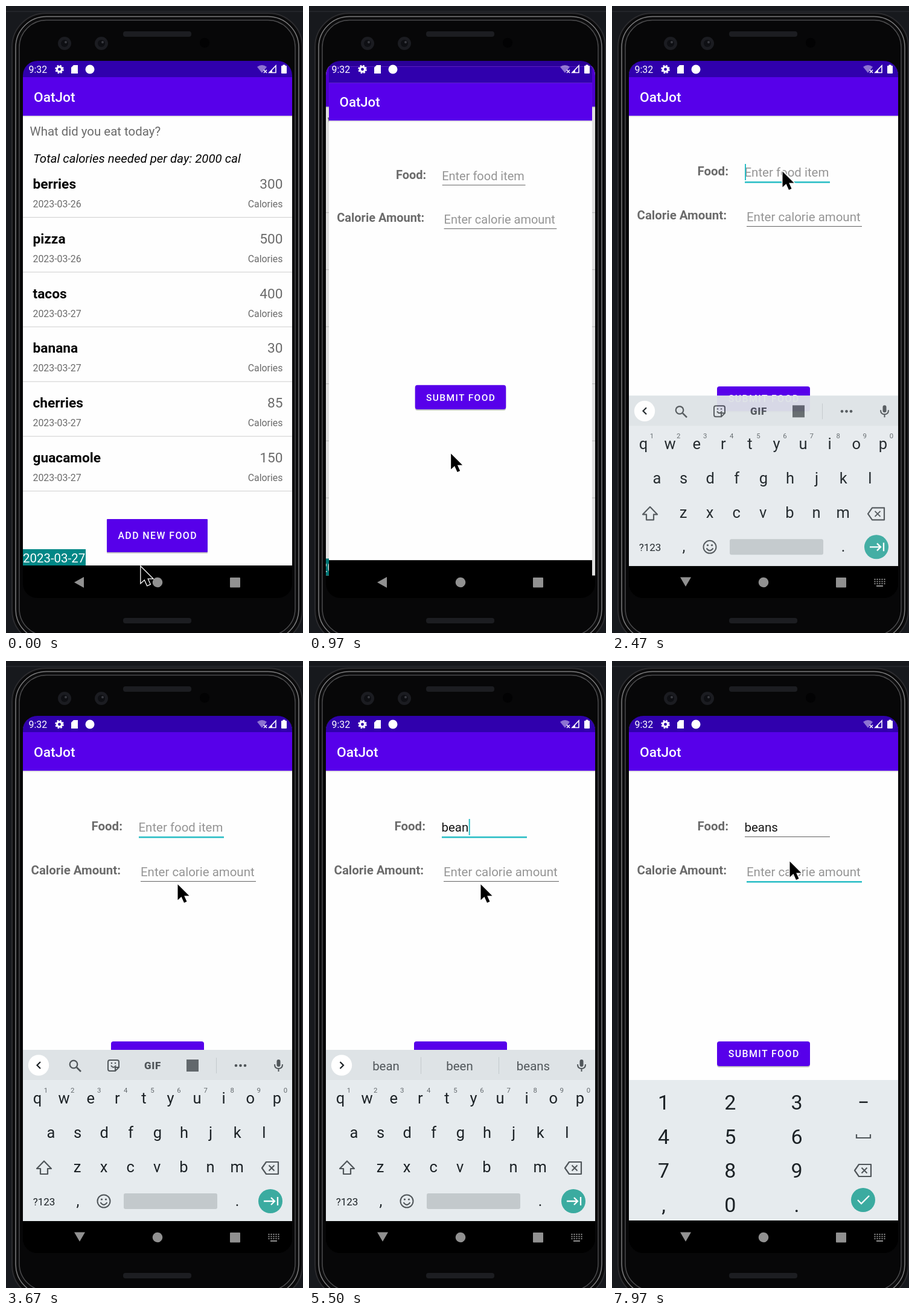
These frames come from a looping animation (492 px wide and 1040 px high, 8 s). An HTML page:

```html
<!DOCTYPE html>
<html lang="en">
<head>
<meta charset="utf-8">
<title>Food log</title>
<style>
  html, body { margin: 0; width: 100%; height: 100%; overflow: hidden; background: #17191d; }
  svg { display: block; width: 492px; height: 1040px; font-family: Roboto, sans-serif; }
</style>
</head>
<body>
<svg id="stage" viewBox="0 0 492 1040"></svg>
<script>
const LOOP = 8000;
const PURPLE = '#5700ea', PAPER = '#fefefe', MUTED = '#6b6b6b', HINT = '#959595', KEY = '#1c2226', ICON = '#50565a';
const KEYBOARD = '#e6ebee', TOOLBAR = '#dee3e6', RULE = '#c3c9cc';
const TEAL = '#2cbec6', GREEN = '#3baba0', NAV = '#919191';
const BODY = 20.44, SMALL = 15.9, LARGE = 22.7;

const rect = (x, y, w, h, fill, extra = '') =>
  `<rect x="${x}" y="${y}" width="${w}" height="${h}" fill="${fill}" ${extra}/>`;
const circle = (x, y, r, fill, extra = '') =>
  `<circle cx="${x}" cy="${y}" r="${r}" fill="${fill}" ${extra}/>`;
const line = (d, color, width = 2, extra = '') =>
  `<path d="${d}" fill="none" stroke="${color}" stroke-width="${width}" ${extra}/>`;
const shape = (d, fill) => `<path d="${d}" fill="${fill}"/>`;
const text = (s, x, y, size, fill, extra = '') =>
  `<text x="${x}" y="${y}" font-size="${size}" fill="${fill}" ${extra}>${s}</text>`;
const MID = 'text-anchor="middle"', END = 'text-anchor="end"', BOLD = 'font-weight="700"', MEDIUM = 'font-weight="500"';

function phoneBody() {
  const speaker = y => rect(194, y, 113, 9, '#1c1d21', 'rx="4"');
  const lens = x => circle(x, 62, 11, '#1b1c21') + circle(x, 62, 6, '#0e0f13') + circle(x + 2, 60, 2, '#3a3b42');
  return rect(0, 0, 492, 1040, '#17191d') + rect(0, 8, 492, 2, '#23252a') +
    rect(10, 12, 481, 1046, '#0a0a0b', 'rx="56" stroke="#2c2c2f" stroke-width="2"') +
    rect(16, 17.5, 469, 1034, '#0c0c0d', 'rx="51" stroke="#7c7c7d" stroke-width="1.5"') +
    rect(22, 23.5, 457, 1021, '#070708', 'rx="45" stroke="#4a4a4c" stroke-width="1.5"') +
    speaker(42) + speaker(1015) + lens(97) + lens(158) + circle(329, 61, 8, '#020203');
}

const appWindow = content =>
  rect(28, 91, 446, 891, '#000') + rect(28, 118, 446, 810, PAPER) + content +
  rect(28, 182, 446, 2, '#d4d4d8', 'opacity=".7"') +
  rect(28, 91, 446, 27, '#3000ad') + rect(28, 118, 446, 64, PURPLE) +
  text('OatJot', 46, 159, LARGE, '#fff', MEDIUM);

function button(label, x, y, w, h, r) {
  return rect(x, y + 2, w, h, '#b0b0b0', `rx="${r}" opacity=".75"`) + rect(x, y, w, h, PURPLE, `rx="${r}"`) +
    text(label, x + w / 2 + .7, y + h / 2 + 5.8, SMALL, '#fff', `${MID} ${MEDIUM} letter-spacing="1.42"`);
}

function foodList() {
  const foods = [['berries', 300, 26], ['pizza', 500, 26], ['tacos', 400, 27],
    ['banana', 30, 27], ['cherries', 85, 27], ['guacamole', 150, 27]];
  const rows = foods.map(([name, calories, day], i) => {
    const y = i * 90.8;
    return text(name, 44.5, 303 + y, LARGE, '#050505', BOLD) +
      text(`2023-03-${day}`, 44.5, 334 + y, SMALL, MUTED) +
      text(calories, 458.5, 303 + y, LARGE, MUTED, END) +
      text('Calories', 458.5, 334 + y, SMALL, MUTED, END) +
      rect(28, 350 + y, 446, 1.1, '#d2d2d2');
  }).join('');
  return appWindow(text('What did you eat today?', 39.5, 215, BODY, MUTED) +
    text('Total calories needed per day: 2000 cal', 45, 260, BODY, '#050505', 'font-style="italic"') + rows +
    button('ADD NEW FOOD', 167, 851, 167, 55, 1) +
    rect(28, 901, 104, 27, '#018786') + text('2023-03-27', 28, 923, BODY, '#fff'));
}

function foodForm() {
  return appWindow(text('Food:', 141.5, 281, BODY, MUTED, BOLD) +
    text('Calorie Amount:', 41.5, 354, BODY, MUTED, BOLD) +
    text('', 219.5, 283, BODY, HINT, 'id="food"') + text('Enter calorie amount', 223, 357, BODY, HINT) +
    rect(220, 291, 141, 1, MUTED, 'id="foodLine"') + rect(223, 365, 191, 1, MUTED, 'id="calLine"') +
    rect(220, 262, 2, 27, TEAL, 'id="foodCaret"') + rect(223, 336, 2, 27, TEAL, 'id="calCaret"') +
    button('SUBMIT FOOD', 174, 631, 154, 41, 4));
}

function statusIcons() {
  return text('9:32', 37.5, 110.5, SMALL, '#fff') +
    circle(88.5, 105, 4, 'none', 'stroke="#fff" stroke-width="3.2"') +
    circle(88.5, 105, 6.2, 'none', 'stroke="#fff" stroke-width="2.2" stroke-dasharray="2.8 2.07"') +
    shape('M112 98h7v14h-11v-10z', '#fff') + circle(139, 105, 7.5, '#fff') +
    `<g opacity=".45">${shape('M416 101Q424 95 432 101L424 111z', '#fff')}</g>` +
    line('M427 106l5 5m0-5l-5 5', '#fff', 1.5) +
    line('M436 110.5H447V99z', '#fff', 1.6) + shape('M441 105v6h-6z', '#fff') +
    rect(456, 99, 9, 13, '#fff', 'rx="1"') + rect(458.5, 97.5, 4, 2, '#fff');
}

function navIcons() {
  let keys = '';
  for (let i = 0; i < 15; i++) keys += rect(434.5 + i % 5 * 4, 950 + Math.floor(i / 5) * 3.6, 2, 2, NAV);
  return `<g id="navBack">${shape('M113 956L129 947V965z', NAV)}</g>` +
    `<g id="navHide">${shape('M113 947.5H131L122 963z', NAV)}${keys}${rect(438, 961, 11, 2, NAV)}</g>` +
    circle(251, 956, 8.3, NAV) + rect(371, 948, 17, 16.5, NAV, 'rx="1"');
}

const backspace = (x, y) => line(`M${x - 14} ${y}l7-10h20v20h-20z`, ICON, 2.2, 'stroke-linejoin="round"') +
  line(`M${x - 2.5} ${y - 4.5}l9 9m0-9l-9 9`, ICON, 2);
const chevron = d => circle(54, 670.5, 17.2, '#fff') + line(d, KEY, 2.2);

function letterKeys() {
  const row = (letters, x, y) => [...letters].map((c, i) => text(c, x + i * 44.1, y, 25.5, KEY, MID)).join('');
  const digits = [...'1234567890'].map((c, i) => text(c, 66 + i * 44.1, 715.5, 11.4, '#62686c', MID)).join('');
  const tools = chevron('M57 665l-5.5 5.5 5.5 5.5') +
    circle(112, 669, 6.3, 'none', `stroke="${ICON}" stroke-width="2.2"`) + line('M117 674l7 7', ICON, 2.6) +
    line('M172 662h12q3 0 3 3v9l-6 6h-9q-3 0-3-3v-12q0-3 3-3zM187 674h-6v6', ICON, 2) +
    line('M174 671q4 6 8 0', ICON, 2) + circle(175, 667, 1.2, ICON) + circle(181, 667, 1.2, ICON) +
    text('GIF', 243, 676.5, 17, ICON, `${MID} font-weight="900" letter-spacing=".6"`) +
    rect(299, 661, 20, 20, '#62686c') + rect(348, 658, 1, 26, RULE) +
    [381, 388.5, 396].map(x => circle(x, 671, 2.3, ICON)).join('');
  const suggestions = chevron('M51.5 665l5.5 5.5-5.5 5.5') +
    [127.5, 249.5, 371.5].map((x, i) => text('', x, 678.5, BODY, ICON, `${MID} id="word${i}"`)).join('') +
    rect(185, 657, 1, 28, RULE) + rect(314, 657, 1, 28, RULE);
  return rect(28, 645, 446, 284, KEYBOARD) + rect(28, 645, 446, 50, TOOLBAR) +
    `<g id="tools">${tools}</g><g id="suggestions">${suggestions}</g>` +
    rect(448.5, 661, 6, 12, ICON, 'rx="3"') + line('M445 669q0 7 6.5 7t6.5-7M451.5 676v5', ICON, 2) +
    digits + row('qwertyuiop', 52, 734) + row('asdfghjkl', 74.5, 791) + row('zxcvbnm', 118, 848) +
    line('M63 829.5L75 842H69V851H57V842H51z', ICON, 2.2, 'stroke-linejoin="round"') + backspace(438, 841) +
    text('?123', 63, 902.5, 17, KEY, MID) + text(',', 119, 904, 25, KEY, MID) + text('.', 383, 904, 25, KEY, MID) +
    circle(162, 896, 10.5, 'none', `stroke="${ICON}" stroke-width="2"`) + line('M156.5 898q5.5 8 11 0', ICON, 2) +
    circle(158.5, 893, 1.6, ICON) + circle(165.5, 893, 1.6, ICON) +
    rect(195, 883, 155, 26, RULE, 'rx="3"') +
    circle(438, 896, 20, GREEN) + line('M427 896h18m-6-6l6 6-6 6M450 889v14', '#fff', 2.3);
}

function numberKeys() {
  const keys = ['123−', '456', '789', ',0.'].map((row, r) =>
    [...row].map((c, i) => text(c, 85.5 + i * 110.3, 744 + r * 56.6, 34, KEY, MID)).join('')).join('');
  return rect(28, 695, 446, 233, KEYBOARD) + keys +
    line('M405 785v6h23v-6', ICON, 2.2) + backspace(416, 845) +
    circle(416, 894, 20, GREEN) + line('M407 894l6 6 13-13', '#fff', 2.3);
}

document.getElementById('stage').innerHTML =
  `<defs><clipPath id="screen"><rect x="28" y="91" width="446" height="891" rx="24"/></clipPath>
   <clipPath id="above"><rect x="28" y="91" width="446" height="838"/></clipPath></defs>` + phoneBody() +
  `<g clip-path="url(#screen)">
     <g id="list">${foodList()}</g>${rect(28, 91, 446, 891, '#000', 'id="dim"')}
     <g id="form">${foodForm()}</g>
   </g>
   <g clip-path="url(#above)"><g id="letters">${letterKeys()}</g><g id="numbers">${numberKeys()}</g></g>` +
  statusIcons() + navIcons() +
  `<path id="cursor" d="M1.5 2.5V28.5L7.5 23L12 33L16.5 31L12.2 21.500H20.500z" fill="#000" stroke="#fff" stroke-width="2.6" paint-order="stroke"/>`;

const ui = {};
document.querySelectorAll('#stage [id]').forEach(el => ui[el.id] = el);

const OPEN = 820, FOCUS_FOOD = 2120, KEYS_IN = 2380, TYPE_START = 4880, TYPE_STEP = 190, FOCUS_CAL = 6220, NUMBERS = 6480;
const WORDS = ['', 'b but be', 'be by best', 'bea bear beat', 'bean been beans', "beans Bean's means"];
// time, x, y of each rest and turn of the pointer
const POINTER = [[0, 222, 928], [400, 219, 885], [700, 219, 885], [1557, 281, 272], [2650, 281, 272],
  [3150, 283, 368], [5750, 283, 368], [6150, 296, 322], [6900, 296, 322], [7200, 293, 330], [LOOP, 293, 330]];

const clamp = v => Math.max(0, Math.min(1, v));
const settle = (v, power) => 1 - (1 - clamp(v)) ** power;
const show = (el, on) => el.setAttribute('display', on ? 'inline' : 'none');
const scaleAbout = (el, s) => el.setAttribute('transform', `translate(251 536.5) scale(${s}) translate(-251 -536.5)`);
const blink = age => age >= 0 && age % 1000 < 500;

function pointerAt(t) {
  const i = POINTER.findIndex(p => p[0] > t), [t0, x0, y0] = POINTER[i - 1], [t1, x1, y1] = POINTER[i];
  const u = (t - t0) / (t1 - t0), e = u * u * (3 - 2 * u);
  return [x0 + (x1 - x0) * e, y0 + (y1 - y0) * e];
}

function underline(el, active) {
  el.setAttribute('height', active ? 2.6 : 1.1);
  el.setAttribute('fill', active ? TEAL : MUTED);
}

function draw(t) {
  const opening = settle((t - OPEN) / 400, 4);
  scaleAbout(ui.list, 1 + .05 * opening);
  scaleAbout(ui.form, .85 + .15 * opening);
  ui.form.setAttribute('opacity', clamp((t - OPEN - 35) / 50));
  ui.dim.setAttribute('opacity', .14 * opening);

  const typed = Math.max(0, Math.min(5, Math.floor((t - TYPE_START) / TYPE_STEP) + 1));
  ui.food.textContent = typed ? 'beans'.slice(0, typed) : 'Enter food item';
  ui.food.setAttribute('fill', typed ? '#151515' : HINT);
  const inFood = t >= FOCUS_FOOD && t < FOCUS_CAL, inCal = t >= FOCUS_CAL;
  underline(ui.foodLine, inFood);
  underline(ui.calLine, inCal);
  const lastKey = typed ? TYPE_START + (typed - 1) * TYPE_STEP : FOCUS_FOOD;
  show(ui.foodCaret, inFood && blink(t - lastKey));
  show(ui.calCaret, inCal && blink(t - FOCUS_CAL));
  ui.foodCaret.setAttribute('x', typed ? 220 + ui.food.getComputedTextLength() : 220);

  // the keyboard fades in over a short rise
  const rise = settle((t - KEYS_IN) / 200, 5);
  ui.letters.setAttribute('transform', `translate(0 ${28 * (1 - rise)})`);
  ui.letters.setAttribute('opacity', rise);
  show(ui.letters, rise > 0 && t < NUMBERS);
  show(ui.numbers, t >= NUMBERS);
  show(ui.tools, !typed);
  show(ui.suggestions, typed);
  WORDS[typed].split(' ').forEach((word, i) => ui['word' + i].textContent = word);
  show(ui.navHide, rise > 0);
  show(ui.navBack, rise === 0);

  ui.cursor.setAttribute('transform', `translate(${pointerAt(t).join(' ')})`);
}

const start = performance.now();
function tick() {
  draw((performance.now() - start) % LOOP);
  requestAnimationFrame(tick);
}
tick();
</script>
</body>
</html>
```
